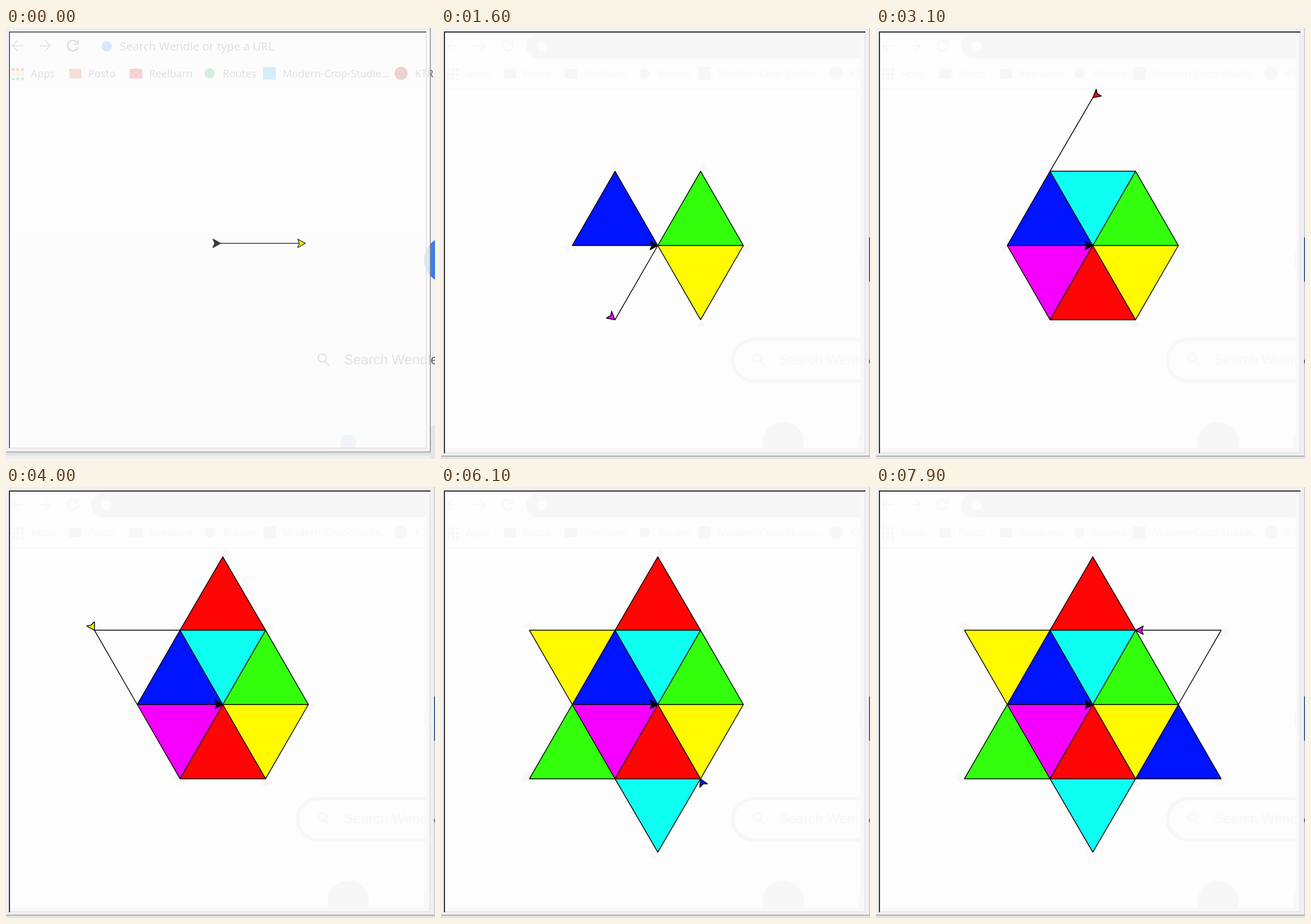
Animation, 746 px wide and 751 px high, one loop 8000 ms. Source, as an HTML page with a canvas:

```html
<!DOCTYPE html>
<html lang="en">
<head>
<meta charset="utf-8">
<title>Turtle star</title>
<style>
  html, body { margin: 0; width: 746px; height: 751px; overflow: hidden; background: #fff; }
  canvas { display: block; }
</style>
</head>
<body>
<canvas id="stage" width="746" height="751"></canvas>
<script>
const ctx = document.getElementById('stage').getContext('2d');
const LOOP = 8000, TICK = 100;
// Turtle units are whole pixels of a smaller screen, enlarged onto the stage.
const SIDE = 100, ZOOM = 1.488, HOME = { x: 0, y: 0 }, CENTER = { x: 377, y: 379 };
const COLORS = {
  yellow: '#fffa00', green: '#33ff0d', blue: '#0014ff',
  magenta: '#f500ff', cyan: '#0dfff2', red: '#ff0505'
};

// Turtle program: F = forward, number = left turn, * = fill, word = new colour.
const lap = '120 F 120 F 120 F 120';
const next = color => `F * ${color} 300 F`;
const START = -40;
const phases = [
  [1896, 'yellow F 240 F 240 F 240 * green F 120 F 120 F 120 * ' +
         'blue 180 F 240 F 240 F 240 * magenta 60 F 240 F 240 F'],
  [2310, '* cyan 60 F 120 F 120 F'],
  [2750, '120 * red 180 F 120 F 120 F *'],
  [3390, 'F 300 F 240 F 240 F * yellow F'],
  [3990, lap], [4400, next('green')],
  [4990, lap], [5420, next('cyan')],
  [6010, lap], [6340, next('blue')],
  [6900, lap], [7290, next('magenta')],
  [7850, lap], [7890, 'F']
].map(([end, text]) => {
  const ops = text.split(' ');
  return { end, ops, steps: ops.reduce((sum, op) => sum + cost(op), 0) };
});

function cost(op) {
  if (op === 'F') return 2;
  return op > 0 ? 1 + Math.floor(op / 30) : 0;
}

function ahead(p, deg, dist) {
  const a = deg * Math.PI / 180;
  return { x: p.x + dist * Math.cos(a), y: p.y - dist * Math.sin(a) };
}

function stateAt(t) {
  const s = { pos: HOME, heading: 0, color: 'yellow', path: [HOME], fills: [] };
  let from = START;
  for (const { end, ops, steps } of phases) {
    let left = t >= end ? Infinity : Math.floor((t - from) / (end - from) * steps + 1e-6);
    for (const op of ops) {
      if (left <= 0) return s;
      const need = cost(op), part = need ? Math.min(1, left / need) : 1;
      if (op === 'F') {
        s.pos = ahead(s.pos, s.heading, SIDE * part);
        s.path.push(s.pos);
      } else if (op === '*') {
        s.fills.push({ color: s.color, points: s.path.slice(-3) });
      } else if (need) {
        s.heading += op * part;
      } else {
        s.color = op;
      }
      left -= need;
    }
    if (t < end) return s;
    from = end;
  }
  return s;
}

function trace(points) {
  ctx.beginPath();
  for (const p of points) {
    ctx.lineTo(CENTER.x + Math.round(p.x) * ZOOM, CENTER.y + Math.round(p.y) * ZOOM);
  }
}

function turtle(pos, heading, fill, stroke) {
  trace([pos, ahead(pos, heading + 151, 10.3), ahead(pos, heading + 180, 7), ahead(pos, heading + 209, 10.3)]);
  ctx.closePath();
  ctx.fillStyle = fill;
  ctx.fill();
  if (stroke) {
    ctx.strokeStyle = stroke;
    ctx.stroke();
  }
}

function rect(x, y, w, h, color) {
  ctx.fillStyle = color;
  ctx.fillRect(x, y, w, h);
}

function disc(x, y, r, color) {
  ctx.beginPath();
  ctx.arc(x, y, r, 0, 7);
  ctx.fillStyle = color;
  ctx.fill();
}

function label(text, x, y, font, color) {
  ctx.font = font;
  ctx.fillStyle = color;
  ctx.fillText(text, x, y);
}

function line(d, color, width) {
  ctx.strokeStyle = color;
  ctx.lineWidth = width;
  ctx.stroke(new Path2D(d));
}

// The browser page that shines through the window.
function page(ghost) {
  const tint = c => ghost || c;
  const ui = size => `${size}px "Open Sans", "Noto Sans", sans-serif`;
  const text = tint('#5c5c5c');
  if (ghost) {
    ctx.beginPath();
    ctx.roundRect(148, 11, 620, 42, 21);
    ctx.fillStyle = ghost;
    ctx.fill();
  }
  line('M30 31H11M20 22L11 31L20 40', tint('#888'), 2);
  line('M58 31H77M68 22L77 31L68 40', tint('#888'), 2);
  line('M123 25A9 9 0 1 0 125 33M125 21V28H118', tint('#444'), 2.2);
  disc(175, 32, 9, ghost ? '#fdfdfd' : '#4285f4');
  if (!ghost) label('Search Wendle or type a URL', 198, 39, ui(20), text);

  const dots = ['#ea4335', '#fbbc05', '#34a853'];
  for (let i = 0; i < 9; i++) {
    const row = Math.floor(i / 3);
    rect(10 + i % 3 * 8, 70 + row * 8, 5, 5, tint(dots[row]));
  }
  rect(110, 71, 21, 17, tint('#e0554b'));
  rect(215, 71, 22, 17, tint('#e02020'));
  disc(354, 79, 9, tint('#34a853'));
  rect(447, 68, 22, 22, tint('#30a5e8'));
  disc(687, 79, 11.5, tint('#a02028'));
  [['Apps', 43], ['Posto', 143], ['Reelbarn', 249], ['Routes', 377],
   ['Modern-Crop-Studie...', 481], ['KTR', 711]]
    .forEach(([name, x]) => label(name, x, 86, ui(18), text));
  rect(0, 106, 746, 1, tint('#f4f4f4'));

  disc(768, 404, 41, tint('#3f7de8'));
  ctx.beginPath();
  ctx.roundRect(507, 543, 300, 72, 36);
  ctx.strokeStyle = tint('#f0f0f0');
  ctx.lineWidth = ghost ? 6 : 2;
  ctx.stroke();
  line('M555 581L562 588M557 575A7 7 0 1 1 543 575A7 7 0 1 1 557 575', tint('#777'), 2.4);
  label('Search Wendle', 588, 586, '24px "Liberation Sans", Arial, sans-serif', tint('#666'));
  disc(595, 722, 36, tint('#eef1f3'));
  if (!ghost) disc(595, 722, 14, '#b7cbd6');
  disc(762, 722, 36, tint('#e4e6e8'));
}

function firstWindow() {
  rect(0, 0, 746, 751, '#f3f3f3');
  page();
  rect(0, 0, 738, 739, 'rgba(255,255,255,.8)');
  rect(7, 107, 724, 250, '#fdfdfd');
  rect(0, 0, 738, 6, '#f0f0f0');
  rect(0, 0, 4, 738, '#f0f0f0');
  rect(5, 6, 726, 2, '#686868');
  rect(5, 6, 2, 726, '#686868');
  rect(730, 8, 2, 724, '#e6e6e6');
  rect(7, 731, 725, 2, '#e6e6e6');
  rect(0, 733, 737, 5, '#f2f2f2');
  rect(737, 0, 1.5, 739, '#8c8c8c');
  rect(0, 738, 738, 1.5, '#9a9a9a');
  rect(0, 740, 738, 5, '#e2e2e2');
  rect(0, 745, 738, 6, '#efefef');
}

function mainWindow() {
  rect(0, 0, 746, 751, '#f0f0f0');
  rect(5, 6, 733, 735, '#fdfdfd');
  ctx.save();
  ctx.beginPath();
  ctx.rect(7, 8, 730, 732);
  ctx.clip();
  page('#f7f7f7');
  rect(730, 8, 7, 732, '#f8f8f8');
  rect(7, 732, 730, 7, '#f8f8f8');
  ctx.restore();
  rect(5, 6, 733, 2, '#303030');
  rect(5, 6, 2, 735, '#303030');
  rect(736.5, 8, 1.5, 732, '#e3e3e3');
  rect(7, 739.5, 731, 1.5, '#e3e3e3');
  rect(0, 745, 746, 2, '#b0b0b0');
  rect(0, 747, 746, 4, '#e2e2e2');
  rect(744.5, 0, 1.5, 746, '#c8c8c8');
  rect(744.5, 365, 1.5, 77, '#1f3f86');
  rect(744.5, 578, 1.5, 6, '#555');
}

const states = Array.from({ length: LOOP / TICK }, (_, i) => stateAt(i * TICK));

function draw(tick) {
  const s = states[tick], ink = tick ? '#000' : '#3c3c3c';
  if (tick) mainWindow(); else firstWindow();
  ctx.save();
  // The window opens slightly smaller than its final size.
  if (!tick) ctx.scale(.99, .99);
  ctx.lineJoin = 'round';
  // Faint residue of earlier turtle poses.
  for (let i = 1; i < tick; i++) turtle(states[i].pos, states[i].heading, '#f7f7f7');
  for (const f of s.fills) {
    trace(f.points);
    ctx.fillStyle = COLORS[f.color];
    ctx.fill();
  }
  trace(s.path);
  ctx.strokeStyle = ink;
  ctx.lineWidth = 1.45;
  ctx.stroke();
  turtle(HOME, 0, ink, ink);
  turtle(s.pos, s.heading, COLORS[s.color], ink);
  ctx.restore();
}

const began = performance.now();
let shown = -1;
function run() {
  const tick = Math.floor((performance.now() - began) % LOOP / TICK);
  if (tick !== shown) draw(shown = tick);
  requestAnimationFrame(run);
}
run();
</script>
</body>
</html>
```
